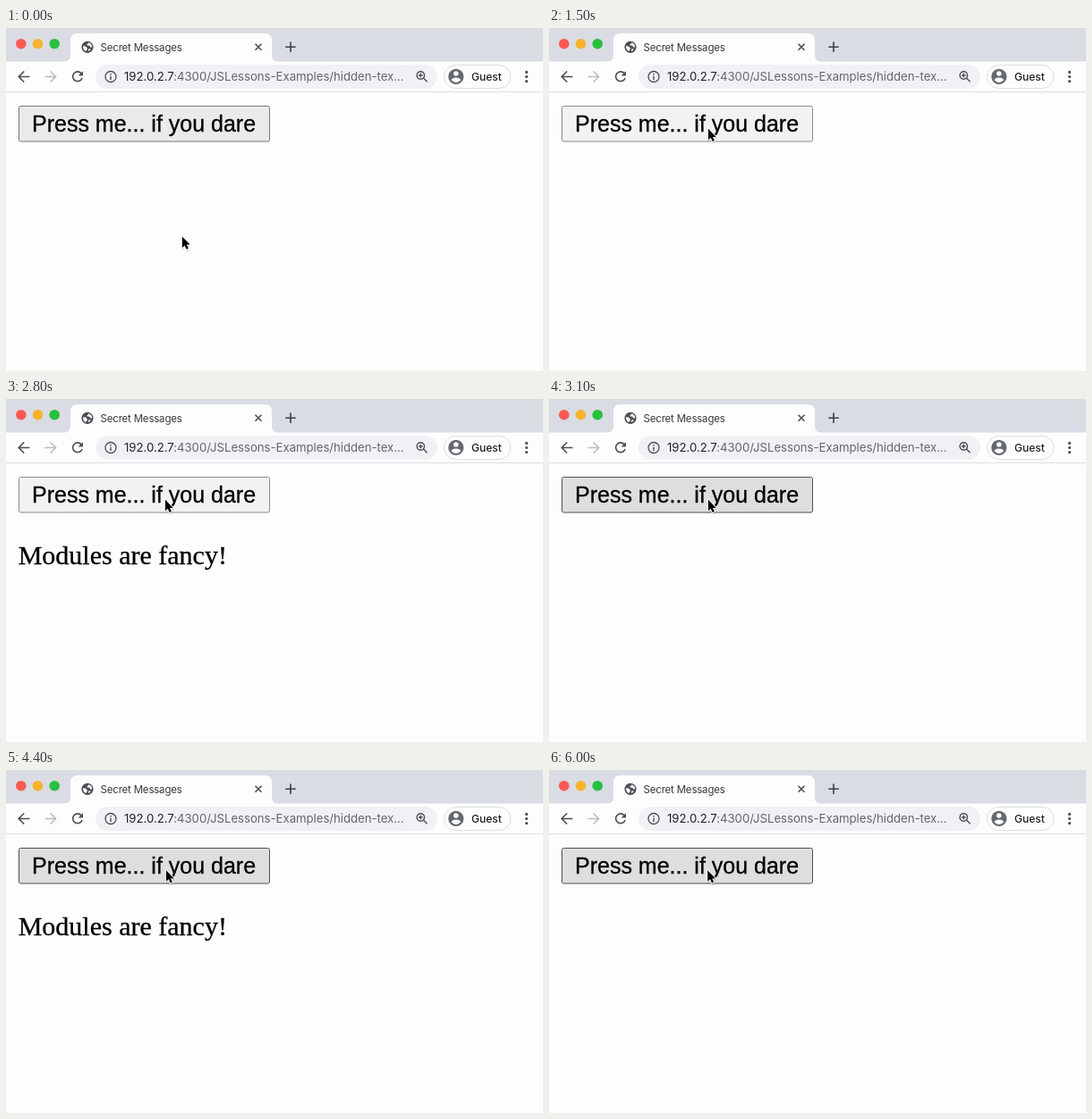
These frames come from a looping animation (600x384 px, 6100 ms). An HTML page:

```html
<!DOCTYPE html>
<html lang="en">
<head>
<meta charset="utf-8">
<title>Secret Messages</title>
<style>
  html, body { margin: 0; width: 100%; height: 100%; overflow: hidden; background: #fefdfe; }
  svg { display: block; width: 100%; height: 100%; }
  .ui { font-family: Inter, Roboto, sans-serif; }
  .page { stroke: #000; stroke-width: .3; }
  .line { fill: none; stroke: #4b4e53; stroke-width: 1.6; }
</style>
</head>
<body>
<svg viewBox="0 0 600 384">
  <rect width="600" height="384" fill="#fefdfe"/>

  <!-- tab strip -->
  <rect width="600" height="37.5" fill="#d9dce3"/>
  <path d="M64 38q8 0 8-8V14q0-8 8-8H289q8 0 8 8V30q0 8 8 8z" fill="#fefdfe"/>
  <circle cx="16.8" cy="17.7" r="5.8" fill="#fb5a54"/>
  <circle cx="35.5" cy="17.7" r="5.8" fill="#f6b42d"/>
  <circle cx="54.2" cy="17.7" r="5.8" fill="#28c03e"/>
  <circle cx="91" cy="21.3" r="6.6" fill="#4b4e53"/>
  <path d="M86 20.2l3 .2 1.8 2.2-.3 1.8-1.6 1.6q-3-2-2.9-5.8zM92 16.2q4 1 4.3 5l-2.2.2-.7-1.6-2.6-.3-.4-1.5 1.7-.4zM92.2 23.4h2.8l-2.2 2.6-1-.9z" fill="#fefdfe"/>
  <text class="ui" x="105.6" y="25.7" font-size="11.5" letter-spacing="-.2" fill="#36393d">Secret Messages</text>
  <path class="line" d="M278.5 17.8l7 7m0-7l-7 7"/>
  <path class="line" d="M312.3 21.2h11.4m-5.7-5.7v11.4" style="stroke:#3c4043"/>

  <!-- toolbar -->
  <path class="line" d="M26.4 54.5H14.2m6-6l-6 6 6 6"/>
  <path class="line" d="M43.4 54.5h12.2m-6-6l6 6-6 6" style="stroke:#babcc0"/>
  <path class="line" d="M84 50.6A5.4 5.4 0 1 0 85.1 56"/>
  <path d="M86 48.2v5.4h-5.4z" fill="#4b4e53"/>
  <rect x="100" y="41" width="382" height="27" rx="13.5" fill="#f0f1f4"/>
  <circle class="line" cx="117" cy="54.5" r="6" style="stroke-width:1.3"/>
  <path class="line" d="M117 53.7v4.2m0-6.9v1.5" style="stroke-width:1.4"/>
  <text class="ui" x="132" y="59.2" font-size="13.2" letter-spacing="-.03" fill="#63666b"><tspan fill="#202124">192.0.2.7</tspan>:4300/JSLessons-Examples/hidden-tex...</text>
  <circle class="line" cx="463.3" cy="53" r="4.2" style="stroke-width:1.4"/>
  <path class="line" d="M466.4 56.1l4.2 4.2M461 53h4.6m-2.3-2.3v4.6" style="stroke-width:1.4"/>
  <rect x="489.5" y="41.5" width="74.5" height="26" rx="13" fill="#fefdfe" stroke="#dcdee2"/>
  <circle cx="502.8" cy="54.4" r="8.6" fill="#65696e"/>
  <circle cx="502.8" cy="51" r="2.8" fill="#fefdfe"/>
  <path d="M497.4 58q1.6-2.4 5.4-2.4t5.4 2.4q-2 2.9-5.4 2.9t-5.4-2.9z" fill="#fefdfe"/>
  <text class="ui" x="520" y="58.9" font-size="12.1" font-weight="500" letter-spacing="-.05" fill="#202124">Guest</text>
  <g fill="#4b4e53">
    <circle cx="581.6" cy="49.4" r="1.6"/>
    <circle cx="581.6" cy="54.5" r="1.6"/>
    <circle cx="581.6" cy="59.6" r="1.6"/>
  </g>
  <path d="M0 71.5H600" stroke="#dcdee1"/>

  <!-- page -->
  <rect id="button" x="14.5" y="87.5" width="280" height="39.5" rx="2"/>
  <text class="page" x="29" y="115.6" font-size="25" font-family="'Liberation Sans', Arial, sans-serif">Press me... if you dare</text>
  <text class="page" id="message" x="13.7" y="185.2" font-size="30" font-family="'Liberation Serif', Times, serif">Modules are fancy!</text>
  <g id="cursor">
    <path d="M0 1.2V15l3.2-2.7 2.2 4.6 2.6-1.2-2-4.6h4.2z" fill="#000" opacity=".15"/>
    <path d="M0 0V12.4l2.8-2.5 2 4.3 2.2-.9-1.9-4.2h3.8z" stroke="#fff" stroke-width="1.8" paint-order="stroke" stroke-linejoin="round"/>
  </g>
</svg>
<script>
const LOOP = 6100, STEP = 100;
const CLICKS = [1500, 2800, 4000, 5400];
const LOOKS = {
  idle: ['#ebe9eb', '#767676'],
  hover: ['#dfdddf', '#4f4f4f'],
  press: ['#f3f1f3', '#8a8a8a']
};
// time, x, y
const PATH = [
  [0, 196.8, 233.5], [300, 196.8, 233.5], [900, 177.9, 112.8],
  [4300, 177.9, 112.8], [4400, 178.9, 112.3],
  [4800, 178.9, 112.3], [5100, 177.2, 112.3], [LOOP, 177.2, 112.3]
];
const button = document.getElementById('button');
const message = document.getElementById('message');
const cursor = document.getElementById('cursor');

const ease = p => p * p * (3 - 2 * p);

function pointer(t) {
  const i = PATH.findIndex(k => k[0] > t);
  const [t0, x0, y0] = PATH[i - 1], [t1, x1, y1] = PATH[i];
  const p = ease((t - t0) / (t1 - t0));
  return [x0 + (x1 - x0) * p, y0 + (y1 - y0) * p];
}

function draw(time) {
  const t = Math.floor(time % LOOP / STEP) * STEP;
  const [x, y] = pointer(t);
  const released = CLICKS.filter(c => t >= c + STEP).length;
  const look = CLICKS.includes(t) ? 'press' : y < 127 ? 'hover' : 'idle';
  const [fill, stroke] = LOOKS[look];
  button.setAttribute('fill', fill);
  button.setAttribute('stroke', stroke);
  message.setAttribute('visibility', released % 2 ? 'visible' : 'hidden');
  cursor.setAttribute('transform', `translate(${x} ${y})`);
}

const start = performance.now();
function tick() {
  draw(performance.now() - start);
  requestAnimationFrame(tick);
}
tick();
</script>
</body>
</html>
```
